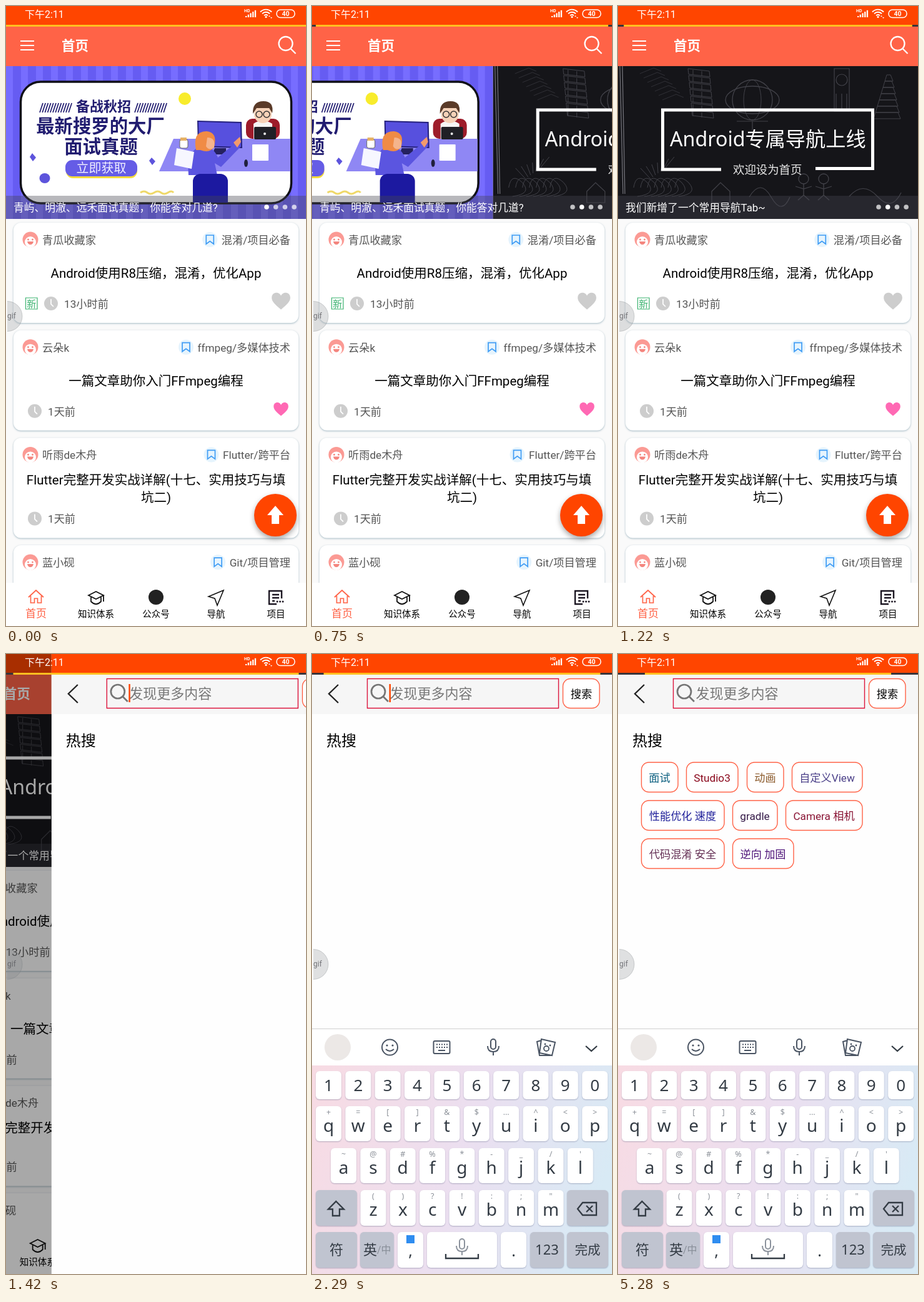
An HTML page with a canvas that plays this animation: 480x990 px, repeating every 5.4 s.

```html
<!DOCTYPE html>
<html lang="zh-CN">
<head>
<meta charset="utf-8">
<style>
  html, body { margin: 0; width: 100%; height: 100%; overflow: hidden; background: #fff; }
  canvas { display: block; }
</style>
</head>
<body>
<canvas id="stage" width="480" height="990"></canvas>
<script>
const ctx = document.getElementById('stage').getContext('2d');
const W = 480, H = 990, LOOP = 5400;
const TOMATO = '#ff6347', ORANGE = '#ff4500', NAVY = '#211c70', SLATE = '#4a5463';
const UI = 'Roboto, "Noto Sans CJK SC", "Noto Sans CJK", sans-serif';
const WIDE = '"Noto Sans", "Noto Sans CJK SC", "Noto Sans CJK", sans-serif';
// Moments at which the screen refreshes
const TICKS = [0, 90, 400, 500, 600, 660, 750, 850, 950, 1040, 1140, 1230, 1320, 1420, 1520, 1630,
  1740, 2000, 2090, 2190, 2290, 2500, 2730, 2790, 3080, 3210, 3350, 3450, 3750, 3770, 4030, 4260,
  4320, 4530, 4700, 4830, 4990, 5280];

const progress = (t, start, length) => Math.min(1, Math.max(0, (t - start) / length));
const easeOut = x => 1 - (1 - x) ** 3;
const easeInOut = x => (1 - Math.cos(Math.PI * x)) / 2;

function text(str, x, y, size, color = '#000', align = 'left', weight = 400, family = UI) {
  ctx.font = `${weight} ${size}px ${family}`;
  ctx.textAlign = align;
  ctx.fillStyle = color;
  ctx.fillText(str, x, y);
}
function rect(x, y, w, h, color) {
  ctx.fillStyle = color;
  ctx.fillRect(x, y, w, h);
}
function paint(path, fill, stroke, width = 2) {
  if (fill) { ctx.fillStyle = fill; ctx.fill(path); }
  if (stroke) { ctx.strokeStyle = stroke; ctx.lineWidth = width; ctx.stroke(path); }
}
function round(x, y, w, h, r, fill, stroke, width) {
  const p = new Path2D();
  p.roundRect(x, y, w, h, r);
  paint(p, fill, stroke, width);
}
function oval(x, y, rx, ry, fill, stroke, width) {
  const p = new Path2D();
  p.ellipse(x, y, rx, ry, 0, 0, 7);
  paint(p, fill, stroke, width);
}
const circle = (x, y, r, fill, stroke, width) => oval(x, y, r, r, fill, stroke, width);
const line = (d, color, width = 2) => paint(new Path2D(d), null, color, width);
const shape = (d, color) => paint(new Path2D(d), color);
function at(x, y, draw) {
  ctx.save();
  ctx.translate(x, y);
  draw();
  ctx.restore();
}
function shadowed(color, blur, dy, draw) {
  ctx.save();
  Object.assign(ctx, { shadowColor: color, shadowBlur: blur, shadowOffsetY: dy });
  draw();
  ctx.restore();
}
function magnifier(x, y, r, color, width) {
  circle(x, y, r, null, color, width);
  line(`M${x + r * .7} ${y + r * .7}l${r * .75} ${r * .75}`, color, width);
}

function statusIcons(t) {
  text('下午2:11', 30, 19, 16, '#fff');
  text('HD', 381, 10, 7, '#fff', 'left', 700);
  for (let i = 0; i < 5; i++) rect(383 + i * 3.7, 16 - i * 2.3, 2.3, 2 + i * 2.3, '#fff');
  for (let i = 0; i < 3; i++) {
    const r = 4 + i * 4.2, p = new Path2D();
    p.arc(416, 18, r, -Math.PI * .76, -Math.PI * .24);
    paint(p, null, '#fff', 1.9);
  }
  circle(416, 17.5, 1.6, '#fff');
  if (t < 4530) shape('M420 17l1.5-2 1.5 2zM423 18h3l-1.5 2z', '#fff');
  round(433, 6, 29, 12.5, 6, null, '#fff', 1.5);
  text('40', 447.5, 16, 10.5, '#fff', 'center', 700);
}

function interviewBanner() {
  rect(0, 96, W, 244, '#665cf2');
  for (let x = 0; x < W; x += 24) rect(x, 96, 11, 244, '#776dff');
  round(23.5, 121, 433, 194, 32, '#fff', '#101018', 3.5);
  text('备战秋招', 156, 168, 22, NAVY, 'center', 700);
  for (const x of [54, 206])
    for (let i = 0; i < 12; i++) line(`M${x + i * 4.2} 170l5-15`, NAVY, 1.7);
  text('最新搜罗的大厂', 151, 202, 29.4, NAVY, 'center', 700);
  text('面试真题', 152, 235, 29.4, NAVY, 'center', 700);
  round(96, 250, 114, 25, 11, '#f5dc3c');
  round(95, 246, 115, 26, 11, '#655ce6');
  text('立即获取', 152.5, 266, 20, '#f0efff', 'center');
  circle(286, 148, 10, '#f8ec2c');
  oval(62, 275, 8.5, 8, '#5d54dc');
  shape('M42 235l6 7-5 6-5-7zM233 242l6 6-5 6-5-7z', '#5d54dc');
  line('M215 298q6-4 11 0t11 0 11 0 11 0 9 0', '#efd96a', 3);

  shape('M268 212H455V264H245z', '#8f87f4');
  round(384, 180, 54, 32, 10, '#9d1c2a');
  shape('M396 188q14-10 30 0v24h-30z', '#f5f5f5');
  circle(411, 173, 14, '#f6d2b8');
  shape('M395 172q-1-20 17-20 17 0 14 19l-5-8h-20z', '#5a3a28');
  circle(405, 173, 5, null, '#333', 1.5);
  circle(417, 173, 5, null, '#333', 1.5);
  round(397, 193, 35, 20, 2, '#202026');
  circle(414, 204, 2, '#eee');
  shape('M306 183l71 2 1 42-71-2z', '#24207c');
  shape('M308 185l67 2 1 38-67-2z', '#5750de');
  shape('M334 227h18v10h-22z', '#25215f');
  round(278, 213, 13, 14, 3, '#fff', '#666', 1);
  shape('M279 210h10v5h-10z', '#e6b266');
  round(394, 221, 26, 26, 1, '#fff');
  oval(384, 251, 3, 6, '#20203c');
  shape('M292 270q-4-42 22-46 18 0 25 18l28-23 8 6-31 32-10-6 4 19z', '#5b55e0');
  shape('M364 218l10-9 2 8-6 9z', '#f39a6c');
  shape('M304 230q-6-30 17-30 18 2 12 24-6 12-22 6z', '#f08b45');
  shape('M322 210q14 0 11 16-8 6-13-2z', '#f5b48c');
  shape('M273 227l28 6-4 27-28-6z', '#f7f7ff');
  round(299, 268, 56, 46, [12, 12, 0, 0], '#1c19a0');
}

function navigationBanner() {
  const chalk = '#424249';
  rect(0, 96, W, 244, '#151519');
  line('M3 96L8 300M7 96L11 300', '#77777e', 1.2);
  for (let i = 0; i < 7; i++) {
    line(`M${112 + i} ${100 + i * 11}l34 4 1 9-34-4zM120 ${102 + i * 11}v8M134 ${104 + i * 11}v8`, chalk, 1);
    line(`M${430 - i * 3} ${110 + i * 10}h${6 + i * 5}l4 10H${427 - i * 3}z`, chalk, 1);
    line(`M${25 + i * 11} 290q4-25 22-8 16 18-16 22`, chalk, 1);
    line(`M${52 + i * 4} ${276 - i * 3}l${i * 5 - 16}-17`, chalk, 1);
    line(`M${35 + i * 6} ${108 + i * 7}l22-9 12 5`, '#303036', 1);
  }
  circle(215, 150, 32, null, chalk, 1.3);
  oval(215, 150, 14, 32, null, chalk, 1);
  oval(215, 150, 43, 22, null, chalk, 1.3);
  line('M190 184h50M215 184v14M346 100h24v68h-24zM349 140v28M358 140v28M366 140v28', chalk, 1.2);
  circle(358, 118, 9, null, chalk, 1.2);
  for (const x of [297, 329]) {
    circle(x, 276, 8, null, chalk, 1.3);
    line(`M${x} 284v18l-9 8M${x} 302l9 8M${x - 13} 288l13 4 13-4`, chalk, 1.3);
  }
  line('M150 296l14-14 15 14v18h-29zM210 305q18-30 35 0t30 0M370 304q22-25 45 0t38-6', chalk, 1.2);
  line('M165 261H71.5V166H407.5V259.5H316', '#fff', 5);
  text('Android专属导航上线', 83, 224, 32.2, '#fff', 'left', 400, WIDE);
  text('欢迎设为首页', 184, 268, 18.4, '#e8e8e8');
}

function carousel(t) {
  const shift = W * easeInOut(progress(t, 554, 452));
  ctx.save();
  ctx.beginPath();
  ctx.rect(0, 96, W, 244);
  ctx.clip();
  at(-shift, 0, interviewBanner);
  at(W - shift, 0, navigationBanner);
  ctx.restore();
  rect(0, 303, W, 37, 'rgba(70,70,80,.38)');
  text(shift < W / 2 ? '青屿、明澈、远禾面试真题，你能答对几道?' : '我们新增了一个常用导航Tab~', 12, 328, 16.8, '#fff');
  const active = t < 500 ? 0 : 1;
  for (let i = 0; i < 4; i++) circle(417 + i * 14.7, 321, 3.8, i === active ? '#fff' : 'rgba(255,255,255,.72)');
}

const ARTICLES = [
  { author: '青瓜收藏家', tag: '混淆/项目必备', title: ['Android使用R8压缩，混淆，优化App'], age: '13小时前', fresh: true },
  { author: '云朵k', tag: 'ffmpeg/多媒体技术', title: ['一篇文章助你入门FFmpeg编程'], age: '1天前', liked: true },
  { author: '听雨de木舟', tag: 'Flutter/跨平台', title: ['Flutter完整开发实战详解(十七、实用技巧与填', '坑二)'], age: '1天前' },
  { author: '蓝小砚', tag: 'Git/项目管理', title: [], age: '' },
];

function heart(x, y, s, color) {
  at(x, y, () => {
    ctx.scale(s, s);
    shape('M0 13C-9 5-14 1-14-5C-14-14-3-15 0-8C3-15 14-14 14-5C14 1 9 5 0 13z', color);
  });
}

function avatar(x, y) {
  circle(x, y, 12.5, '#fb9a94');
  circle(x, y + 4, 9, '#fff');
  circle(x - 3.5, y, 1.4, '#f4857e');
  circle(x + 3.5, y, 1.4, '#f4857e');
  shape(`M${x - 5} ${y + 3}h10q-1 5-5 5t-5-5z`, '#f4857e');
}

function card(a) {
  shadowed('rgba(90,130,150,.55)', 3, 1, () => round(12, 0, 456, 160, 12, '#fff'));
  avatar(39, 27);
  text(a.author, 58, 34, 17.2, '#555');
  text(a.tag, 455, 34, 17.2, '#555', 'right');
  const iconX = 455 - ctx.measureText(a.tag).width - 18.5;
  circle(iconX, 27, 12, '#e6f4fd');
  line(`M${iconX - 6} 20h12v14l-6-4.5-6 4.5z`, '#3f9cf5', 1.7);
  const titleY = a.title.length > 1 ? 75 : 88;
  a.title.forEach((s, i) => text(s, 240, titleY + i * 27.5, 20.5, '#000', 'center'));
  if (!a.age) return;
  const clockX = a.fresh ? 72 : 46;
  if (a.fresh) {
    round(31.5, 120, 18.5, 18, 0, null, '#3cb371', 1.2);
    text('新', 40.7, 134.5, 15, '#3cb371', 'center');
  }
  circle(clockX, 129, 11, '#cdcdcd');
  line(`M${clockX} 122v8l4 4`, '#fff', 1.7);
  text(a.age, clockX + 21, 136, 17.2, '#555');
  if (a.liked) heart(440, 126, .84, '#ff69b4');
  else heart(440, 125, 1.06, '#cdcdcd');
}

function tabBar() {
  rect(0, 921, W, 69, '#fff');
  line('M36 944l12-11 12 11M39.5 942v11h6v-7h5v7h6v-11', TOMATO, 1.7);
  line('M132 941l12-6 12 6-12 6zM136 944v7q8 8 16 0v-7M156 941v10', '#111', 1.8);
  circle(240, 944, 12, '#222');
  line('M324 943l24-10-10 24-4-11z', '#111', 1.6);
  line('M441 946v-12h-20v21h12M426 940h11M426 945h11M426 950h4', '#1a1420', 2.4);
  for (const x of [434, 438.5, 443]) circle(x, 951, 1.5, '#1a1420');
  text('首页', 48, 976, 17, TOMATO, 'center');
  ['知识体系', '公众号', '导航', '项目'].forEach((s, i) => text(s, 144 + i * 96, 976, 14.5, '#000', 'center'));
}

function homePage(t) {
  rect(0, 0, W, H, '#fafafa');
  rect(0, 0, W, 31, ORANGE);
  rect(0, 31, W, 65, TOMATO);
  for (const y of [56, 63, 70]) rect(23, y - 1, 22, 2, '#fff');
  text('首页', 89, 71, 21.5, '#fff', 'left', 700);
  magnifier(447.5, 60, 11, '#fff', 2.3);
  carousel(t);
  ARTICLES.forEach((a, i) => at(0, 346 + i * 171.7, () => card(a)));
  shadowed('rgba(0,0,0,.35)', 8, 4, () => circle(431, 813, 34, ORANGE));
  shape('M431 798l13 15h-7v14h-12v-14h-7z', '#fff');
  tabBar();
}

// Each tag: left edge, width, label, colour
const TAGS = [
  [[37, 59, '面试', '#0d6080'], [109, 83, 'Studio3', '#8b0a1e'], [206, 59, '动画', '#8b5a2b'], [278, 113, '自定义View', '#4a3f88']],
  [[37, 133, '性能优化 速度', '#20209a'], [183, 72, 'gradle', '#351a48'], [268, 123, 'Camera 相机', '#8a1535']],
  [[37, 133, '代码混淆 安全', '#653055'], [183, 98, '逆向 加固', '#4d1278']],
];

function searchPage(t) {
  rect(0, 0, W, H, '#fefefe');
  rect(0, 0, W, 31, ORANGE);
  rect(0, 31, W, 65, '#f6f6f6');
  line('M42 49L27 63.5 42 78', '#222', 2.3);
  round(88.5, 39.5, 306, 47, 0, null, '#dc143c', 1.4);
  magnifier(106, 60, 11, '#757575', 2.7);
  text('发现更多内容', 124.5, 71, 22, '#777');
  if (t < 2160 || (t - 2160) % 1050 < 560) rect(123.5, 48, 2.5, 29, ORANGE);
  round(401.5, 39.5, 58.5, 47, 12, '#fff', TOMATO, 1.4);
  text('搜索', 431, 69.5, 17.2, '#000', 'center');
  text('热搜', 23, 147, 24);
  if (t < 3350) return;
  TAGS.forEach((row, i) => {
    const y = 173 + i * 61;
    for (const [x, w, label, color] of row) {
      round(x + .5, y, w - .5, 47.5, 12, '#fff', TOMATO, 1.4);
      text(label, x + w / 2, y + 31, 17.2, color, 'center');
    }
  });
}

function key(x, y, w, h, label, { hint, size = 28, base = 41, dark } = {}) {
  shadowed('rgba(60,70,110,.35)', 2, 1, () => round(x, y, w, h, 6, dark ? '#c0c4d0' : '#fff'));
  if (hint) text(hint, x + w / 2, y + 14, 12.5, '#8b9098', 'center', 400, WIDE);
  if (label) text(label, x + w / 2, y + base, size, '#333b44', 'center', 400, WIDE);
}
function keyRow(letters, hints, x, y, h, style) {
  [...letters].forEach((c, i) => key(x + i * 47.35, y, 41, h, c, { ...style, hint: hints[i] }));
}
function mic(x, y, color) {
  round(x - 4, y - 13, 8, 16, 4, null, color, 2);
  line(`M${x - 9} ${y - 2}q0 9 9 9t9-9M${x} ${y + 7}v6`, color, 2);
}

function keyboard() {
  const bg = ctx.createLinearGradient(0, 657, W, 800);
  bg.addColorStop(0, '#f8dbe3');
  bg.addColorStop(.55, '#ebdff0');
  bg.addColorStop(1, '#d8eaf5');
  rect(0, 598, W, 59, '#fff');
  rect(0, 598, W, 1, '#cfcfcf');
  rect(0, 657, W, 333, bg);

  circle(41, 628, 21, '#ece8e6');
  circle(124.5, 628, 12.5, null, SLATE, 2);
  circle(120, 625, 1.6, SLATE);
  circle(129, 625, 1.6, SLATE);
  line('M118 631q6.5 6 13 0', SLATE, 2);
  round(194.5, 618, 26, 20, 2, null, SLATE, 2);
  for (let i = 0; i < 10; i++) rect(199 + i % 5 * 4, 622.5 + Math.floor(i / 5) * 4.5, 2, 2, SLATE);
  rect(202, 632, 11, 2, SLATE);
  mic(290, 628, SLATE);
  line('M367 617l-7 2 4 22 18 0M367 615l22 5-5 21-20-4z', SLATE, 2);
  circle(375, 630, 4, null, SLATE, 1.8);
  circle(373, 623, 1.4, SLATE);
  circle(381, 625, 1.4, SLATE);
  line('M438 626l9 8 9-8', '#333b44', 2.2);

  keyRow('1234567890', '', 6, 666, 45, { size: 26, base: 32 });
  keyRow('qwertyuiop', '+=[]&$…^<>', 6, 722, 56);
  keyRow('asdfghjkl', "~@#%*-_/'", 30, 789, 56);
  keyRow('zxcvbnm', '()?!:;"', 77.5, 856, 57);
  const dark = { dark: true, size: 22, base: 36 };
  key(6, 856, 66, 57, '', dark);
  line('M38.5 874l12.5 12.5h-7v10.5h-11v-10.5h-7z', '#333b44', 2.3);
  key(408, 856, 66, 57, '', dark);
  line('M425 886l8-10h22v20h-22zM439 881l10 10M449 881l-10 10', '#333b44', 2.3);
  key(6, 923, 66, 57, '符', dark);
  key(77, 923, 54, 57, '', dark);
  text('英', 82, 959, 22, '#333b44');
  text('/中', 104, 957, 16, '#888e98');
  key(137, 923, 41, 57, ',', { base: 39, size: 25 });
  rect(151, 928, 13, 13, '#2f8df0');
  key(184, 923, 112, 57);
  mic(240, 947, '#8b929c');
  line('M214 958v7h52v-7', '#333b44', 2.3);
  key(302, 923, 41, 57, '.', { base: 39, size: 25 });
  key(349, 923, 54, 57, '123', dark);
  key(408, 923, 66, 57, '完成', { ...dark, size: 20.5 });
}

function recorderButton() {
  ctx.save();
  ctx.beginPath();
  ctx.rect(2, 465, 30, 60);
  ctx.clip();
  circle(2, 495.5, 24, 'rgba(130,135,140,.26)', 'rgba(110,115,120,.3)', 1);
  ctx.restore();
  text('gif', 2, 499, 12, 'rgba(90,90,95,.8)');
}

function draw(t) {
  const open = easeOut(progress(t, 1140, 600));
  if (open < 1) {
    at(-110 * open, 0, () => homePage(t));
    if (open > 0) rect(0, 0, W, H, `rgba(0,0,0,${.4 * open})`);
  }
  if (open > 0) at(W * (1 - open), 0, () => searchPage(t));
  const raised = easeOut(progress(t, 1940, 350));
  if (raised > 0) at(0, 392 * (1 - raised), keyboard);
  recorderButton();
  statusIcons(t);
  const edge = t * .00814;
  rect(0, 30, W, 3, '#38343a');
  rect(edge, 30, W - 2 * edge, 3, '#ffc020');
}

function frame() {
  const time = performance.now() % LOOP;
  draw(TICKS.findLast(tick => tick <= time));
  requestAnimationFrame(frame);
}
frame();
</script>
</body>
</html>
```
